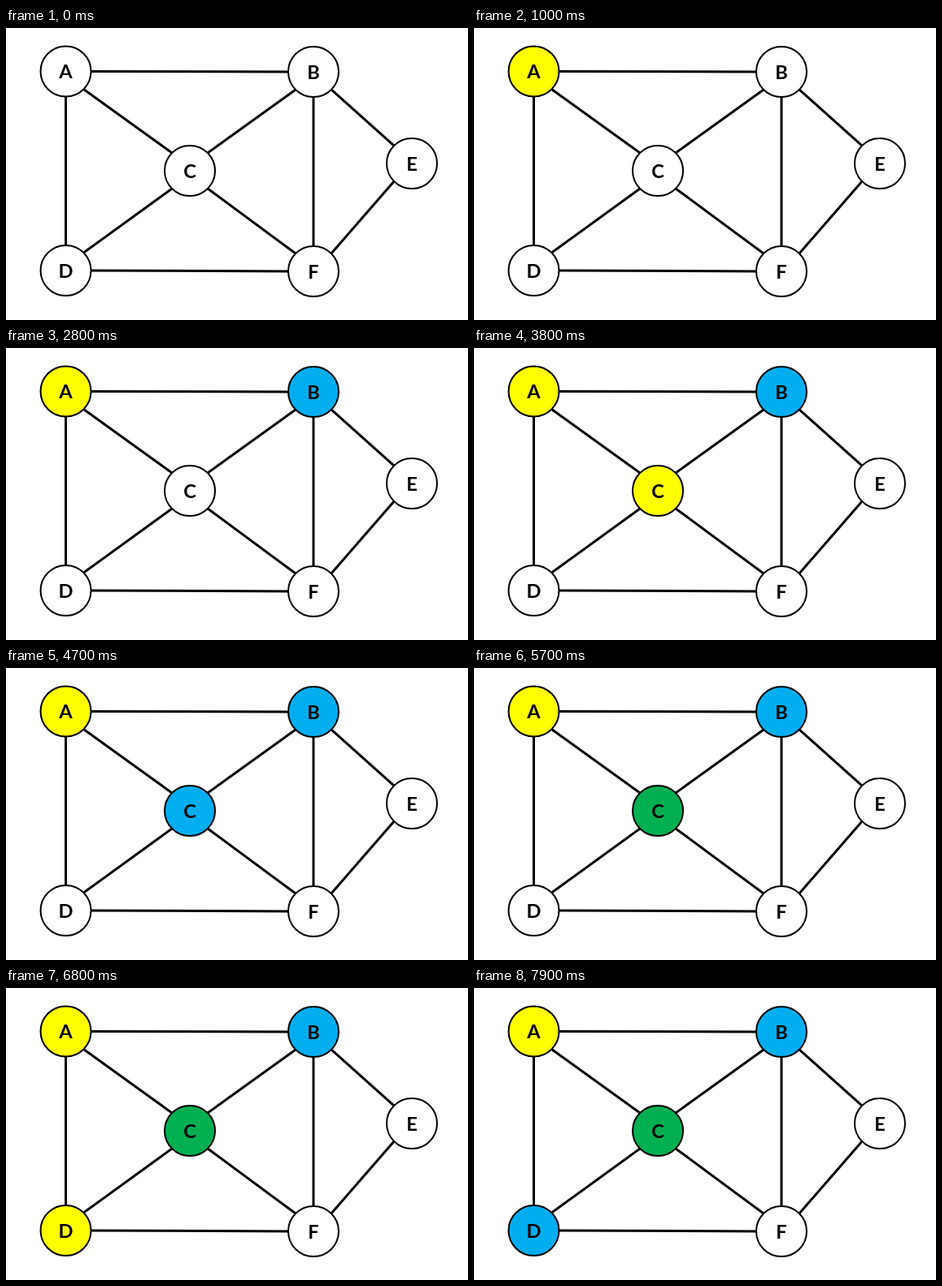
An HTML page that plays this animation: 568x360 px, repeating every 8000 ms.

```html
<!DOCTYPE html>
<html lang="en">
<head>
<meta charset="utf-8">
<title>Graph colouring</title>
<style>
  html, body { margin: 0; width: 100%; height: 100%; overflow: hidden; background: #fff; }
  svg { display: block; }
  line { stroke: #000; stroke-width: 3; }
  circle { stroke: #000; stroke-width: 2; }
  text { font: 700 23.6px Lato, "Open Sans", sans-serif; text-anchor: middle; }
</style>
</head>
<body>
<svg id="stage" width="568" height="360" viewBox="0 0 568 360"></svg>
<script>
const LOOP = 8000, RADIUS = 31;
const WHITE = '#fff', YELLOW = '#ff0', BLUE = '#00aeef', GREEN = '#00b050';

const nodes = {
  A: { x: 73.5, y: 53.5 },
  B: { x: 378, y: 54 },
  C: { x: 226, y: 176 },
  D: { x: 73.5, y: 299 },
  E: { x: 499, y: 167 },
  F: { x: 378, y: 300 }
};
const edges = ['AB', 'AC', 'AD', 'BC', 'BE', 'BF', 'CD', 'CF', 'DF', 'EF'];

// Each colour try: start time, node, colour
const steps = [
  [1000, 'A', YELLOW],
  [1800, 'B', YELLOW],
  [2800, 'B', BLUE],
  [3800, 'C', YELLOW],
  [4700, 'C', BLUE],
  [5700, 'C', GREEN],
  [6600, 'D', YELLOW],
  [7700, 'D', BLUE]
];

const stage = document.getElementById('stage');

function add(tag, attrs) {
  const el = document.createElementNS('http://www.w3.org/2000/svg', tag);
  for (const key in attrs) el.setAttribute(key, attrs[key]);
  return stage.appendChild(el);
}

// Edges meet the circles at the four sides or at the 45 degree points.
function anchorOffset(from, to) {
  const dx = to.x - from.x, dy = to.y - from.y;
  const sx = Math.abs(dx) < 5 ? 0 : Math.sign(dx);
  const sy = Math.abs(dy) < 5 ? 0 : Math.sign(dy);
  const scale = RADIUS / Math.hypot(sx, sy);
  return { x: sx * scale, y: sy * scale };
}

for (const [a, b] of edges) {
  const p = nodes[a], q = nodes[b], o = anchorOffset(p, q);
  add('line', { x1: p.x + o.x, y1: p.y + o.y, x2: q.x - o.x, y2: q.y - o.y });
}

for (const [name, node] of Object.entries(nodes)) {
  node.disc = add('circle', { cx: node.x, cy: node.y, r: RADIUS });
  add('text', { x: node.x, y: node.y + 8.5 }).textContent = name;
}

function render(time) {
  const fills = {};
  for (const [start, name, color] of steps) {
    if (time >= start) fills[name] = color;
  }
  for (const name in nodes) {
    nodes[name].disc.setAttribute('fill', fills[name] || WHITE);
  }
}

function tick() {
  render(performance.now() % LOOP);
  requestAnimationFrame(tick);
}
tick();
</script>
</body>
</html>
```
